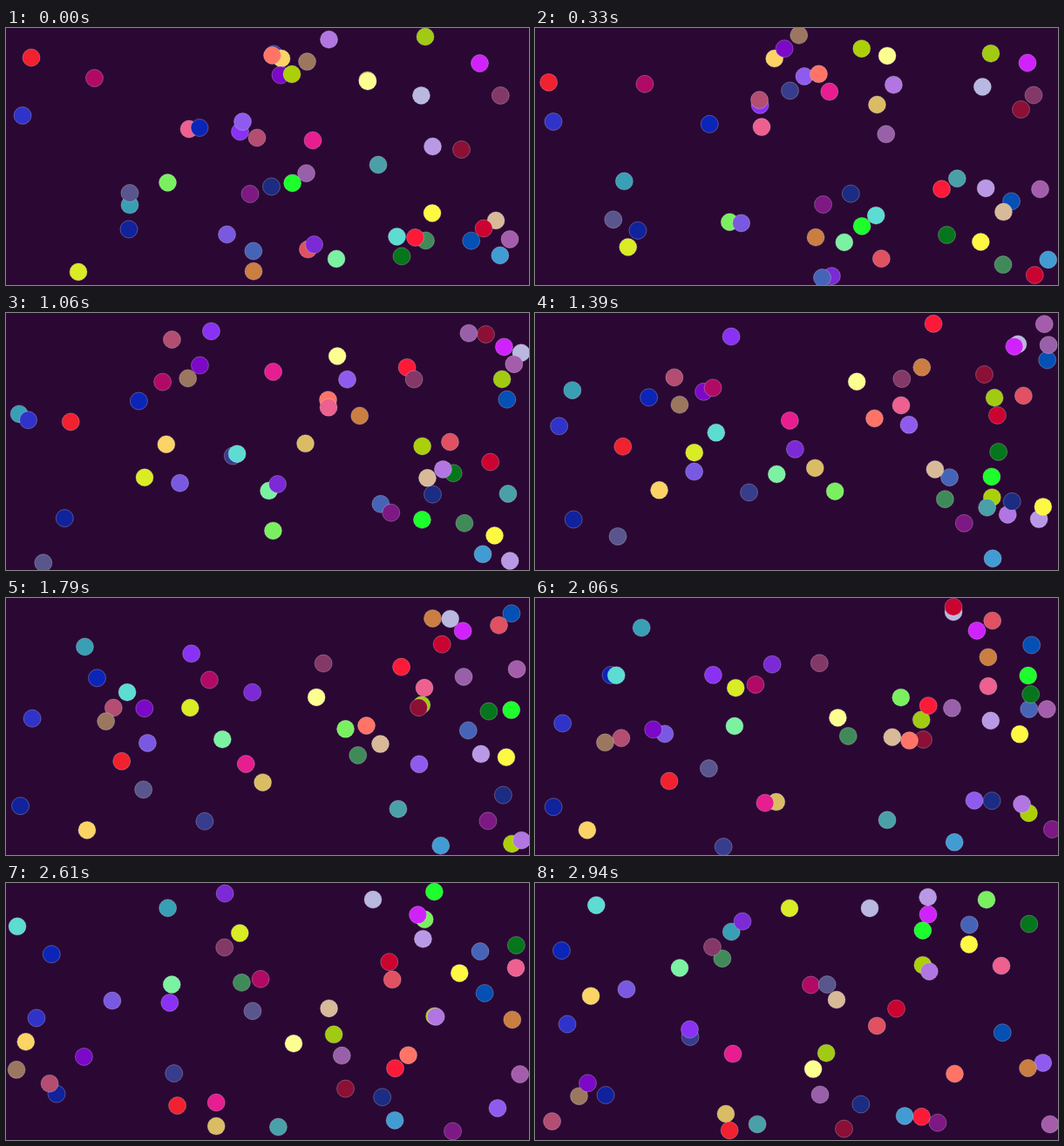
An HTML page with a canvas for the animation above (3000 ms loop, 600 by 295 pixels).

```html
<!DOCTYPE html>
<html lang="en">
<head>
<meta charset="utf-8">
<title>Bouncing balls</title>
<style>
  html, body { margin: 0; width: 100%; height: 100%; overflow: hidden; background: #2b0834; }
  canvas { display: block; }
</style>
</head>
<body>
<canvas id="stage" width="600" height="295"></canvas>
<script>
const ctx = document.getElementById("stage").getContext("2d");
const LOOP = 3000;
const SUBSTEPS = 4;
const WALL = { left: 10, right: 591, top: 9.7, bottom: 285.8 };
const balls = [];

// Start position and travel per tick; later balls lie on top.
function ball(color, x, y, vx, vy) {
  balls.push({ color, x, y, vx, vy });
}

ball("#373c8c", 307.2, 30, -2.936, 8.38);
ball("#dabc64", 414.7, 59.9, -4.449, 5.62);
ball("#419cd3", 566.8, 261, 4.39, 0.99);
ball("#0550b4", 533.7, 244.2, 2.57, -9.06);
ball("#408a5a", 481.5, 244, 11.11, 5.52);
ball("#7bf2a2", 379, 265, -4.841, -3.807);
ball("#389fb4", 142, 203.1, -7.93, -5.45);
ball("#e05161", 346.4, 254.1, 10.19, 10.61);
ball("#7b2ad6", 353.5, 248.6, -2.625, 8.02);
ball("#4664b7", 283.8, 256, 9.13, 6.12);
ball("#7af060", 185.5, 177.5, 7.557, 9.05);
ball("#7959e2", 253.5, 237, -3.375, -2.614);
ball("#10229c", 141, 231, -4.61, 0.284);
ball("#fbd465", 316, 35, -8.26, -10.52);
ball("#8931f4", 268.5, 119, -2.068, -6.13);
ball("#b34d71", 288, 126, -6.1, -8.68);
ball("#8f5bef", 271.5, 107.5, 7.5, -10.41);
ball("#9b775f", 345.5, 38.6, -8.55, -6.06);
ball("#7b09c7", 315, 54, -5.784, -6.06);
ball("#b00a66", 101.5, 57.5, 4.886, 1.352);
ball("#59568d", 142, 189.5, -10.44, 6.08);
ball("#d8ba99", 562, 221, -4.909, -1.977);
ball("#05761b", 454, 262, 3.7, -4.886);
ball("#abd007", 328, 53, 9.35, -11.75);
ball("#b176e1", 370.5, 13.2, 8.18, 10.39);
ball("#a1ca12", 481, 10, 8.39, -4.256);
ball("#8c0f35", 522.5, 139.5, 7, -9.2);
ball("#b8b8e0", 476.4, 77.4, 7.39, -1.98);
ball("#b999e6", 489.5, 136, 5.54, 9.58);
ball("#1dff2c", 328.6, 178, 9.3, 9.88);
ball("#d022fc", 543.5, 40.5, 4.3, -0.1);
ball("#fcff90", 415, 61.2, -2.18, -5.86);
ball("#9860a8", 344.5, 166.7, 11.65, -8.97);
ball("#fc1a38", 469.5, 240.5, -0.59, -11.13);
ball("#ff7466", 305.5, 31.5, 4, 4.261);
ball("#7d1884", 280, 190.5, 10.11, 2.42);
ball("#f1212f", 29, 34, -5.32, 5.68);
ball("#2f33ca", 19, 100.5, 0.41, 1.397);
ball("#ed608f", 210, 116, 10, -0.477);
ball("#0b25b8", 222, 114.5, -4.352, -0.84);
ball("#e81d8f", 352, 129, -2.841, -11.18);
ball("#843868", 567.3, 77.5, 9.45, -0.09);
ball("#4aa0a8", 427, 157, 11.46, 3.155);
ball("#1b2c82", 304.5, 182, 11.56, 1.636);
ball("#d9ec24", 83, 280, 4.75, -5.705);
ball("#ca7e41", 284, 279.2, 7.61, 11.12);
ball("#5cdcd2", 448.5, 239.5, -11.46, -4.864);
ball("#fff843", 489, 212.5, 4.47, 6.61);
ball("#cb0330", 548.1, 230, 5.04, 10.72);
ball("#a45dab", 578, 242.5, 0.3, -11.49);

// Fifteen ticks a second, with every fifth one held longer.
const holds = [60, 60, 90, 60, 60, 60, 60, 100, 60, 60, 60, 60, 90, 60, 60];

function tickAt(ms) {
  let tick = Math.floor(ms / 1000) * holds.length;
  let rest = ms % 1000;
  for (const hold of holds) {
    if (rest < hold) break;
    rest -= hold;
    tick++;
  }
  return tick;
}

// Coordinate after n substeps, turning back once past a wall.
function travel(pos, speed, n, low, high) {
  let step = speed / SUBSTEPS;
  while (n-- > 0) {
    pos += step;
    if ((pos < low && step < 0) || (pos > high && step > 0)) step = -step;
  }
  return pos;
}

function draw(tick) {
  const n = tick * SUBSTEPS;
  ctx.fillStyle = "#2b0834";
  ctx.fillRect(0, 0, 600, 295);
  ctx.strokeStyle = "rgba(255, 255, 255, 0.25)";
  ctx.lineWidth = 1;
  for (const b of balls) {
    const x = travel(b.x, b.vx, n, WALL.left, WALL.right);
    const y = travel(b.y, b.vy, n, WALL.top, WALL.bottom);
    ctx.beginPath();
    ctx.arc(x, y, 10, 0, Math.PI * 2);
    ctx.fillStyle = b.color;
    ctx.fill();
    ctx.stroke();
  }
}

let shown = -1;
function frame() {
  const tick = tickAt(performance.now() % LOOP);
  if (tick !== shown) draw(shown = tick);
  requestAnimationFrame(frame);
}
frame();
</script>
</body>
</html>
```
